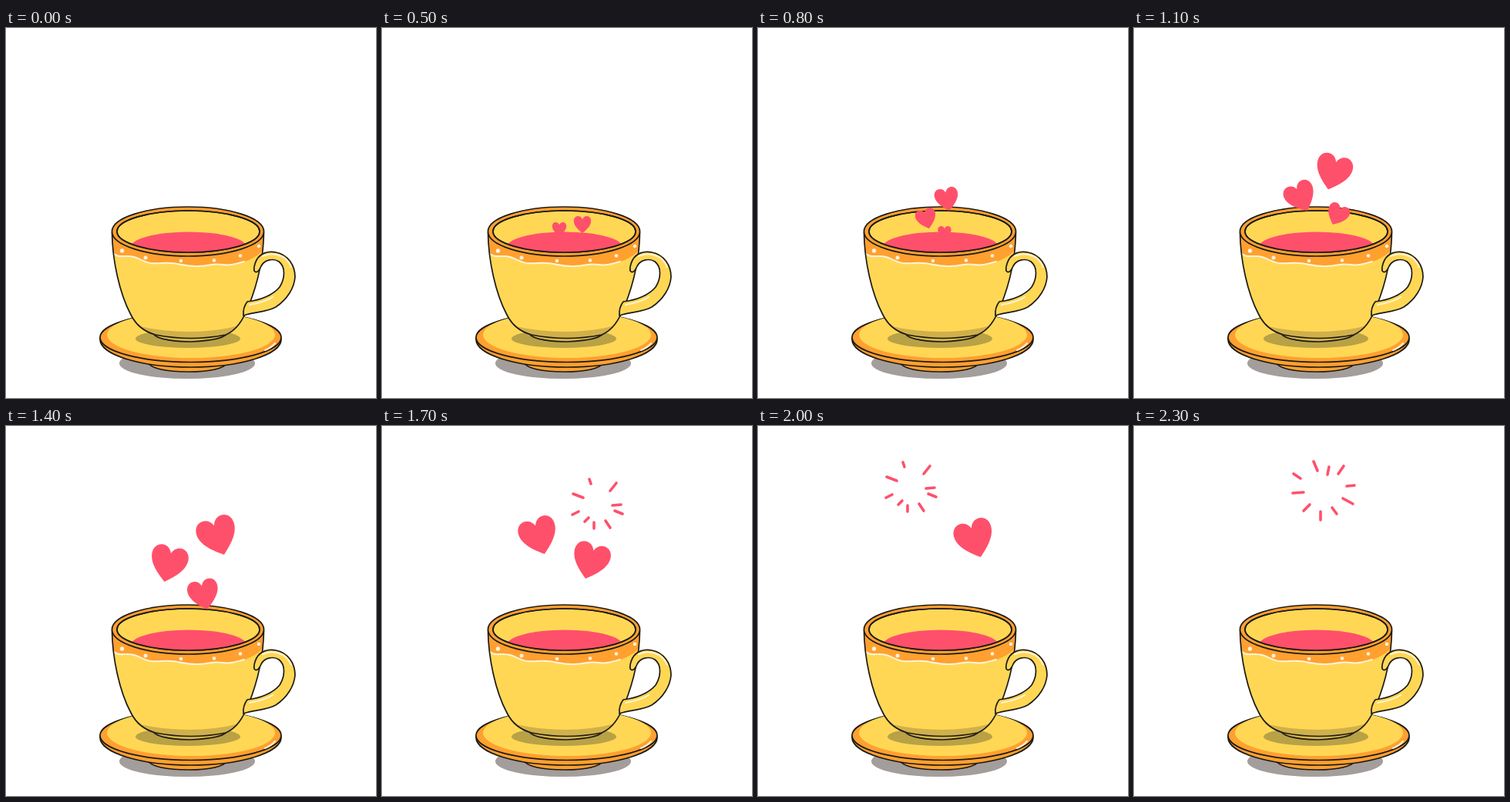
Animation, 480 px wide and 480 px high, one loop 2.6 s. Source, as an HTML page:

```html
<!DOCTYPE html>
<html lang="en">
<head>
<meta charset="utf-8">
<title>Cup of hearts</title>
<style>
  html, body { margin: 0; width: 100%; height: 100%; overflow: hidden; background: #fff; }
  svg { display: block; width: 100%; height: 100%; }
  .ink { stroke: #1d1a16; stroke-width: 1.7; stroke-linejoin: round; stroke-linecap: round; }
  .yellow { fill: #ffd755; }
  .orange { fill: #ffa02f; }
  .none { fill: none; }
  .shine { fill: none; stroke: #fff3dc; stroke-width: 2; stroke-linecap: round; }
  #hearts { fill: #ff506b; }
  #rays { fill: none; stroke: #ff506b; stroke-width: 3.6; stroke-linecap: round; }
</style>
</head>
<body>
<svg viewBox="0 0 480 480">
  <defs>
    <clipPath id="opening"><ellipse cx="236.5" cy="264" rx="92.5" ry="27"/></clipPath>
    <clipPath id="bodyClip"><path id="body" d="M137.5 265C138 301 147 344 162 372C169 386 179 394 194 398Q240 407 285 398C299 392 307 380 315 360C327 330 334 296 334.500 265Z"/></clipPath>
  </defs>

  <!-- saucer -->
  <ellipse cx="235" cy="435" rx="88" ry="20" fill="#a39d9b"/>
  <path class="orange ink" d="M183 434Q193 446 237 446Q279 446 288 434Z"/>
  <ellipse class="orange ink" cx="239.500" cy="404" rx="117.500" ry="36"/>
  <ellipse class="orange ink" cx="239.500" cy="401.500" rx="117.500" ry="32"/>
  <ellipse class="yellow" cx="240" cy="398" rx="109" ry="30"/>
  <ellipse cx="236" cy="403" rx="68" ry="12" fill="#b9a146"/>
  <path class="shine" d="M349 409Q344 415 336 418"/>

  <!-- cup -->
  <path class="ink" fill="#d5b64b" d="M190 394Q192 406 239 407Q286 405 288 394Z"/>
  <use href="#body" class="yellow"/>
  <g clip-path="url(#bodyClip)">
    <path fill="#d0b04a" d="M168 386Q240 402 303 386V410H168Z"/>
    <path class="orange" d="M136 262V293C145 299 155 294 166 297S180 307 202 305S230 310 249 309S267 305 281 307S310 304 319 299S326 295 336 286V262Z"/>
    <path class="shine" d="M140 293C147 299 155 294 166 297S180 307 202 305S230 310 249 309S267 305 281 307S300 305 309 303"/>
  </g>
  <use href="#body" class="none ink"/>
  <ellipse class="orange ink" cx="236" cy="264" rx="98.500" ry="32"/>
  <ellipse class="yellow ink" cx="236.500" cy="264" rx="92.500" ry="27"/>
  <ellipse cx="237" cy="285" rx="76" ry="20.500" fill="#ff506b" clip-path="url(#opening)"/>
  <ellipse class="none ink" cx="236.500" cy="264" rx="92.500" ry="27"/>
  <g fill="#fff3dc">
    <circle cx="150.500" cy="289" r="2.700"/><circle cx="181" cy="298" r="2.500"/>
    <circle cx="227" cy="302" r="2.300"/><circle cx="270" cy="301.500" r="2.300"/>
    <circle cx="304" cy="295.500" r="2.300"/><circle cx="328" cy="283" r="2.300"/>
  </g>
  <path class="yellow ink" d="M325 301C330 292 340 289 350 291C366 294 375 308 375 323C374 337 365 352 350 362C337 369 322 368 308 373Q307 363 313 355C331 353 347 346 355 336C362 325 363 310 354 303C346 298 335 301 331 309Q326 320 322 315Q321 309 325 301Z"/>
  <path class="shine" d="M333 296Q346 290 359 297Q367 302 370 310M316 359Q335 356 346 349"/>

  <path id="hearts"/>
  <path id="rays"/>
</svg>
<script>
const heartPath = document.getElementById('hearts');
const rayPath = document.getElementById('rays');

// Heart outline of unit height with its tip at the origin; first point, then cubic curves.
const outline = [
  [0, 0], [-.1, -.09], [-.51, -.37], [-.51, -.71],
  [-.51, -1.05], [-.1, -1.1], [0, -.8],
  [.1, -1.1], [.51, -1.05], [.51, -.71],
  [.51, -.37], [.1, -.09], [0, 0]
];

function heart([tipX, tipY, size, degrees]) {
  const a = degrees * Math.PI / 180, c = Math.cos(a) * size, s = Math.sin(a) * size;
  const [start, ...curve] = outline.map(([x, y]) =>
    `${(tipX + x * c - y * s).toFixed(2)} ${(tipY + x * s + y * c).toFixed(2)}`);
  return `M${start}C${curve.join(' ')}Z`;
}

// Rays are relative to the centre of the burst.
const smallBurst = 'm-10-32 2 6m33-1-8 10m-48 4 13 5m38 10 11-1m-8 8 10 4m-65 1 8-4m13 8-5 5m12 1v8m15-10 6 9';
const largeBurst = 'm-13-37 5 12m15-5-2 10m21-11-7 10m-58 0 9 6m-10 19 14-1m56-8 10-1m-15 17 13 7m-27 5 6 8m-21-3v11m-14-20-8 8';
const burst = (x, y, rays) => `M${x} ${y}${rays}`;

const poses = [
  { hearts: [] },
  { hearts: [[260, 266, 22, 0], [230, 270, 18, 0]] },
  { hearts: [[248, 237, 30, -11], [222, 260, 26, -16], [242, 274, 17, 0]] },
  { hearts: [[252, 209.5, 46, 16], [225, 237, 39, -26], [258, 255, 28, 25]] },
  { hearts: [[283, 167, 50, -19], [205.500, 202, 47, 13], [261, 238, 39, -13]] },
  { hearts: [[211, 166, 48, -18], [264, 198, 47, 16]], rays: burst(279, 101, smallBurst) },
  { hearts: [[289, 170, 49, -18]], rays: burst(198, 79, smallBurst) },
  { hearts: [], rays: burst(246, 83, largeBurst) }
];

function draw(now) {
  const t = now % 2600;
  const step = t < 500 ? 0 : 1 + Math.floor((t - 500) / 300);
  const { hearts, rays = '' } = poses[step];
  heartPath.setAttribute('d', hearts.map(heart).join(''));
  rayPath.setAttribute('d', rays);
}

const startTime = performance.now();
function tick() {
  draw(performance.now() - startTime);
  requestAnimationFrame(tick);
}
tick();
</script>
</body>
</html>
```
